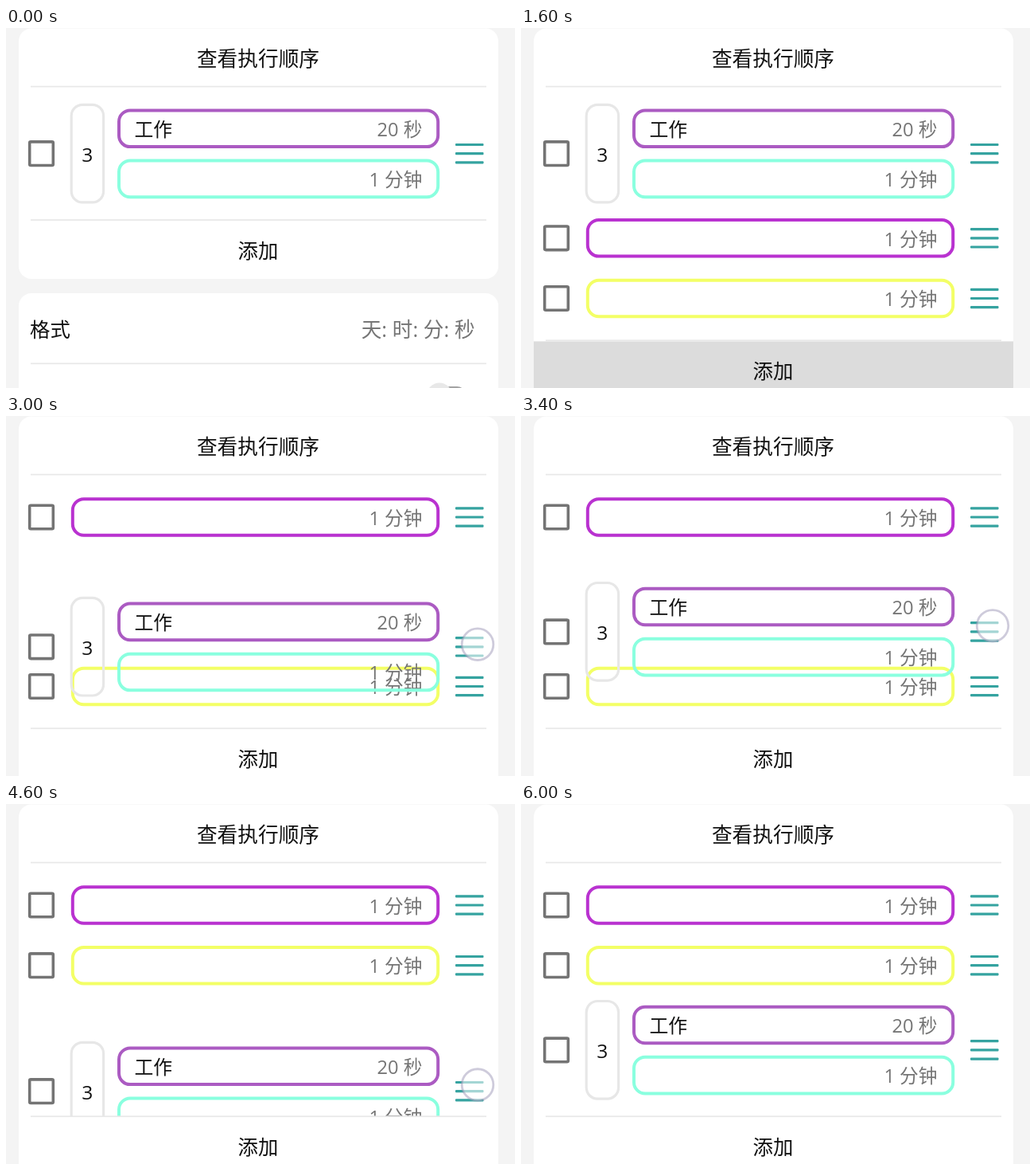
An HTML page for the animation above (6.1 s loop, 640 px wide and 452 px high).

```html
<!DOCTYPE html>
<html lang="zh-CN">
<head>
<meta charset="utf-8">
<title>执行顺序</title>
<style>
  html, body { margin: 0; width: 100%; height: 100%; overflow: hidden; background: #f4f4f4; }
  svg { display: block; width: 640px; height: 452px; }
  text { font-family: "Open Sans", "Noto Sans CJK SC", "Noto Sans CJK", sans-serif; }
</style>
</head>
<body>
<svg id="stage" viewBox="0 0 640 452"></svg>
<script>
const LOOP = 6100;
const PITCH = 75.6;      // height of a single row
const GROUP = 136.8;     // height of the grouped row
const HANDLE = 157.7;    // middle of the grouped row before it is dragged
const INK = '#111', DIM = '#757575';
const stage = document.getElementById('stage');

function add(parent, tag, attrs, text) {
  const node = document.createElementNS('http://www.w3.org/2000/svg', tag);
  for (const key in attrs) node.setAttribute(key, attrs[key]);
  if (text) node.textContent = text;
  parent.appendChild(node);
  return node;
}

// y is the middle of the glyphs
function label(parent, text, x, y, size, fill, anchor = 'start') {
  add(parent, 'text', { x, y: y + size * 0.38, 'font-size': size, fill, 'text-anchor': anchor }, text);
}

function block(parent, x, y, width, height, rx, fill) {
  return add(parent, 'rect', { x, y, width, height, rx, fill });
}

function outline(parent, x, y, width, height, rx, stroke, weight) {
  add(parent, 'rect', { x, y, width, height, rx, fill: 'none', stroke, 'stroke-width': weight });
}

function divider(parent, y) {
  block(parent, 31, y - 0.8, 573, 1.7, 0, '#e8e8e8');
}

function controls(parent, y) {
  outline(parent, 29.7, y - 14.8, 29.6, 29.6, 1.5, '#747474', 3.6);
  for (const dy of [-11.2, 0, 11.2]) block(parent, 565, y + dy - 1.6, 35.5, 3.2, 1, '#35a3a0');
}

function timer(parent, x, y, color, time, name) {
  outline(parent, x, y - 22.8, 543.2 - x, 45.6, 14, color, 4);
  if (name) label(parent, name, 161.5, y + 0.8, 23.8, INK);
  label(parent, time, 523.5, y + 0.8, 23.7, DIM, 'end');
}

function single(parent, y, color) {
  const row = add(parent, 'g');
  controls(row, y);
  timer(row, 83.8, y, color, '1 分钟');
  return row;
}

const defs = add(stage, 'defs');
const listClip = block(add(defs, 'clipPath', { id: 'list' }), 16, 74, 603, 167);
add(add(defs, 'clipPath', { id: 'press' }), 'path', {
  d: 'M16 242H619V299a16 16 0 0 1-16 16H32a16 16 0 0 1-16-16Z'
});

const card = block(stage, 16, 0.5, 603, 314.5, 16, '#fff');
label(stage, '查看执行顺序', 317, 38.3, 25.7, INK, 'middle');
divider(stage, 73.5);

const list = add(stage, 'g', { 'clip-path': 'url(#list)' });
const magenta = single(list, 263.8, '#b932d0');
const yellow = single(list, 339.5, '#f3ff66');

const group = add(list, 'g');
controls(group, HANDLE);
outline(group, 82.2, 96.3, 40.4, 122.6, 14, '#e7e7e7', 3.2);
label(group, '3', 102.3, 158.8, 24.5, INK, 'middle');
timer(group, 142, 126.3, '#ab5bc2', '20 秒', '工作');
timer(group, 142, 189.4, '#8affdf', '1 分钟');

// Everything below the list moves down as rows are added
const lower = add(stage, 'g');
const ripple = add(add(lower, 'g', { 'clip-path': 'url(#press)' }), 'circle', { cx: 400, cy: 289, fill: '#dcdcdc' });
divider(lower, 241);
label(lower, '添加', 317, 279, 25.4, INK, 'middle');
block(lower, 16, 333, 603, 200, 16, '#fff');
label(lower, '格式', 30, 378.5, 25.4, INK);
label(lower, '天: 时: 分: 秒', 589.5, 378.5, 25.6, DIM, 'end');
divider(lower, 421.3);
block(lower, 540, 450, 38, 22, 11, '#a3a3a3');
add(lower, 'circle', { cx: 545, cy: 461.5, r: 16, fill: '#e8e8e8' });

const finger = add(stage, 'circle', {
  r: 19.8, fill: '#fff', 'fill-opacity': 0.55, stroke: '#9d97b8', 'stroke-opacity': 0.5, 'stroke-width': 2.8
});

function ramp(t, start, length) {
  return Math.max(0, Math.min(1, (t - start) / length));
}

function ease(t, start, length) {
  const p = ramp(t, start, length);
  return p * p * (3 - 2 * p);
}

function shift(node, y) {
  node.setAttribute('transform', `translate(0 ${y.toFixed(2)})`);
}

// Down past one row, back into the gap, down past the next, then settle
function drag(t) {
  return 134 * ease(t, 2350, 700) - 55 * ease(t, 3150, 600)
    + 124 * ease(t, 4150, 450) + (2 * PITCH - 203) * ease(t, 4650, 650);
}

const presses = [{ start: 600, reach: 250 }, { start: 1240, reach: 440 }];

function draw(t) {
  const rows = presses.map(press => ramp(t, press.start + 190, 150));
  const drop = PITCH * rows.filter(Boolean).length;
  card.setAttribute('height', 314.5 + drop);
  listClip.setAttribute('height', 167 + drop);
  shift(lower, drop);

  magenta.setAttribute('opacity', rows[0]);
  yellow.setAttribute('opacity', rows[1]);
  shift(magenta, -GROUP * ease(t, 2720, 250));
  shift(yellow, -GROUP * ease(t, 4280, 250));
  shift(group, drag(t));

  const { start, reach } = presses[t < presses[1].start ? 0 : 1];
  ripple.setAttribute('r', reach * ease(t, start, 450));
  ripple.setAttribute('opacity', 1 - ramp(t, start + 430, 200));

  // The touch runs slightly ahead of the row it pulls
  finger.setAttribute('cx', 585 + 8 * ease(t, 2500, 500));
  finger.setAttribute('cy', HANDLE + 2 + 0.95 * drag(t + 30));
  finger.setAttribute('opacity', t >= 2100 && t < 5100 ? 1 : 0);
}

const begin = performance.now();
function tick() {
  draw((performance.now() - begin) % LOOP);
  requestAnimationFrame(tick);
}
draw(0);
requestAnimationFrame(tick);
</script>
</body>
</html>
```
